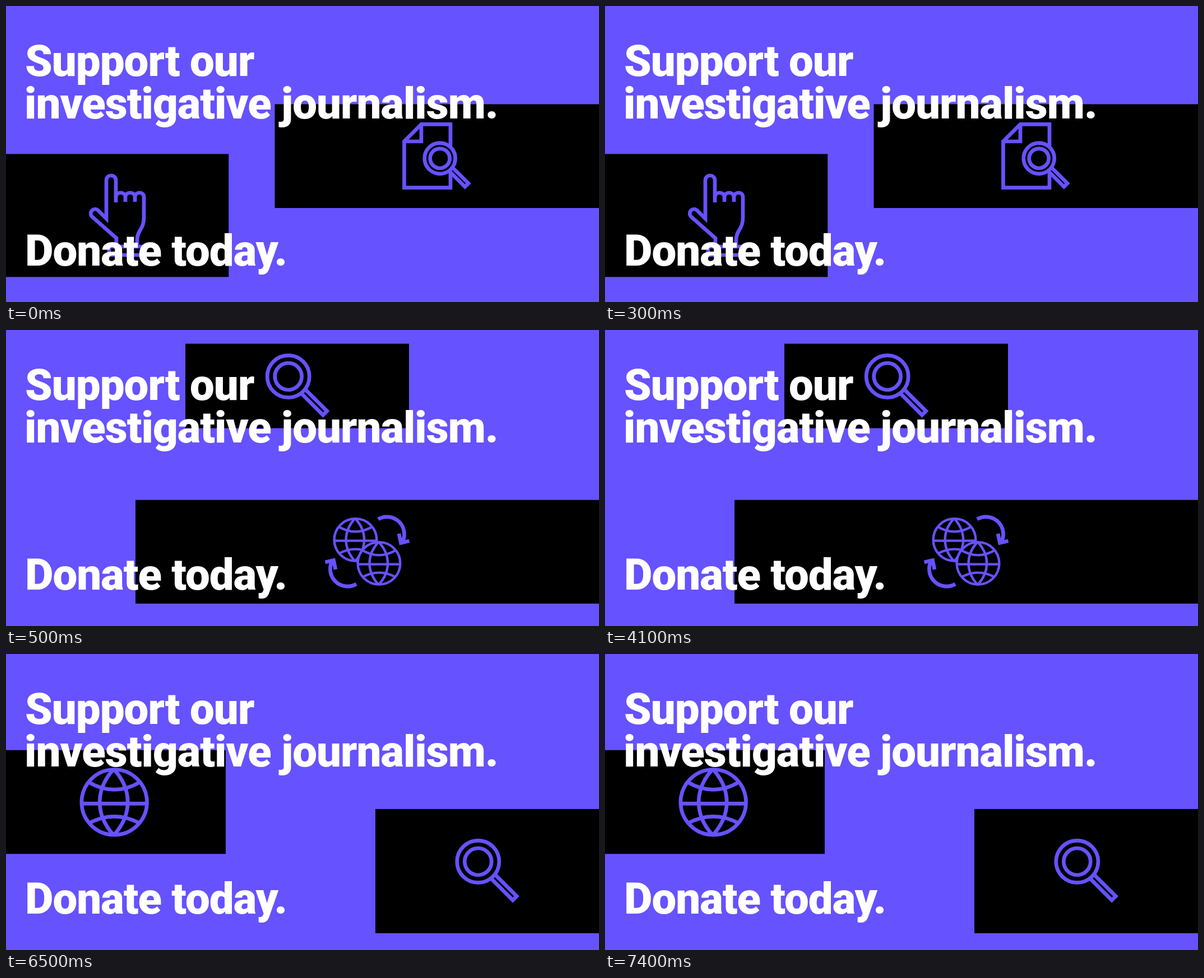
An HTML page for the animation above (8 s loop, 1058 px wide and 529 px high).

```html
<!DOCTYPE html>
<html lang="en">
<head>
<meta charset="utf-8">
<title>Support our investigative journalism</title>
<style>
  html, body { margin: 0; width: 100%; height: 100%; overflow: hidden; background: #6652ff; }
  svg { display: block; width: 100vw; height: 100vh; }
  .icon { fill: none; stroke: #6652ff; stroke-width: 6.7; }
  .solid { fill: #000; }
  .icon path, .icon circle { vector-effect: non-scaling-stroke; }
  text { font: 900 78px Roboto, Inter, sans-serif; letter-spacing: -1.02px; fill: #fff; }

  .scene { visibility: hidden; animation: 8s step-end infinite; }
  .first { animation-name: first; }
  .second { animation-name: second; }
  .third { animation-name: third; }
  @keyframes first { 0% { visibility: visible; } 6.25%, 100% { visibility: hidden; } }
  @keyframes second { 0% { visibility: hidden; } 6.25% { visibility: visible; } 81.25%, 100% { visibility: hidden; } }
  @keyframes third { 0% { visibility: hidden; } 81.25%, 100% { visibility: visible; } }
</style>
</head>
<body>
<svg viewBox="0 0 1058 529">
  <defs>
    <g id="lens">
      <path d="M38 -5H92.5V5H38"/>
      <circle class="solid" r="37.6"/>
      <circle r="24"/>
    </g>
    <g id="globe">
      <circle class="solid" r="58.3"/>
      <path d="M-58.5 2.5H58.5M-2 -58C-34 -22 -34 22 -2 58M0 -58C32 -22 32 22 0 58"/>
      <path d="M-46 -36Q0 -9 46 -36M-46 38Q0 13 46 38"/>
    </g>
    <path id="arrow" d="M664 338A31 31 0 0 1 706 381M701 364L704.5 380.5L719.5 377"/>
  </defs>

  <g class="scene first">
    <path d="M479.5 175.5H1058V361H479.5ZM0 264.5H397.3V484.3H0Z"/>
    <g class="icon">
      <path d="M793 250V211.3H741L710.5 242V324.7H793V296M741 211V242H710.5"/>
      <g transform="translate(774.2 272.3) rotate(45)">
        <path class="solid" d="M29 -4.3H67.5V4.3H29"/>
        <circle class="solid" r="27.5"/>
        <circle r="17.5"/>
      </g>
      <path d="M196 351V312C196 300 179 300 179 312V380L164 365C157 359 147 368 153 376L197 415V430H184V445H244V430H234V418C234 400 246 400 246 378V342C247 331 230 331 230 342V350"/>
      <path d="M196 342C196 331 213 331 213 342V350M213 342C213 331 230 331 230 342M197 430H234"/>
    </g>
  </g>

  <g class="scene second">
    <path d="M320 24.5H719V175.5H320ZM231 303.7H1058V489H231Z"/>
    <g class="icon">
      <use href="#lens" transform="translate(503.7 83) rotate(45)"/>
      <use href="#globe" transform="translate(623.5 375) scale(.65)"/>
      <use href="#globe" transform="translate(665.5 417) scale(.65)"/>
      <use href="#arrow"/>
      <use href="#arrow" transform="rotate(180 644.5 396)"/>
    </g>
  </g>

  <g class="scene third">
    <path d="M0 171.7H392V357.3H0ZM659 277H1058V499H659Z"/>
    <g class="icon">
      <use href="#globe" transform="translate(193.2 264.8)"/>
      <use href="#lens" transform="translate(842.3 371) rotate(45)"/>
    </g>
  </g>

  <text x="34" y="124.5">Support our</text>
  <text x="33" y="200.5">investigative journalism.</text>
  <text x="34" y="464">Donate today.</text>
</svg>
</body>
</html>
```
